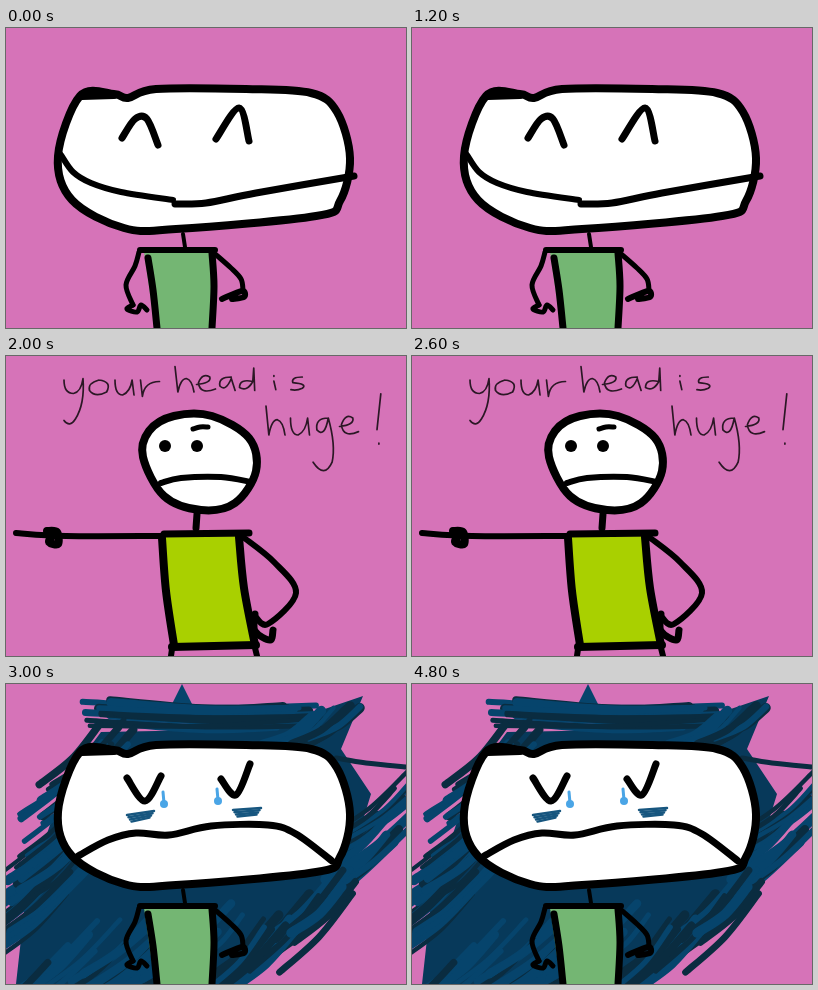
An HTML page with a canvas that plays this animation: 400x300 px, repeating every 6 s.

```html
<!DOCTYPE html>
<html>
<head>
<meta charset="utf-8">
<style>
html, body { margin: 0; width: 100%; height: 100%; overflow: hidden; background: #d673b8; }
canvas { display: block; }
</style>
</head>
<body>
<canvas id="stage" width="400" height="300"></canvas>
<script>
const ctx = document.getElementById('stage').getContext('2d');
ctx.lineCap = ctx.lineJoin = 'round';
const NAVY = '#0a2c40', BLUE = '#06446c', TEAR = '#4aa5e6';

// Smooth brush line through "x,y x,y ..." points; a fill closes the shape.
function brush(points, width, color = '#000', fill) {
  const p = points.split(' ').map(s => s.split(',').map(Number)), n = p.length;
  const at = i => fill ? p[(i + n) % n] : p[Math.max(0, Math.min(n - 1, i))];
  ctx.beginPath();
  ctx.moveTo(...p[0]);
  for (let i = 0; i < (fill ? n : n - 1); i++) {
    const [a, b, c, d] = [at(i - 1), at(i), at(i + 1), at(i + 2)];
    ctx.bezierCurveTo(b[0] + (c[0] - a[0]) / 6, b[1] + (c[1] - a[1]) / 6,
      c[0] - (d[0] - b[0]) / 6, c[1] - (d[1] - b[1]) / 6, ...c);
  }
  if (fill) { ctx.fillStyle = fill; ctx.fill(); }
  ctx.lineWidth = width;
  ctx.strokeStyle = color;
  ctx.stroke();
}

function polygon(points, color) {
  ctx.fillStyle = color;
  ctx.fill(new Path2D(`M${points}Z`));
}

function dot(x, y, r, color = '#000') {
  ctx.fillStyle = color;
  ctx.beginPath();
  ctx.arc(x, y, r, 0, 7);
  ctx.fill();
}

// Pen letters: lowercase bodies fill a unit square.
const letters = {
  y: 'M0 0Q0 .9.5 .9Q.9.8 1-.1Q1.1 1.6.6 2.6Q.3 3.2 0 2.7',
  o: 'M.5 0Q-.1.2 0 .7Q.3 1.2.9.8Q1.2.1.5 0',
  u: 'M0 0Q0 1 .4 1Q.8.8.9 0L1 1',
  r: 'M0 0L.1 1.1Q.2.1 1 .1',
  h: 'M0-.7L.15 1Q.3.1.6.1Q.9.2 1 1',
  e: 'M0 .5Q.8.4.7 0Q.3-.3.1.4Q.2 1.2 1 .8',
  a: 'M.7 0Q0 0 .1.6Q.4 1 .7.1L.9.9',
  d: 'M.7.3Q0 .1 0 .7Q.4 1 .7.3L.75-.6L.8.9',
  g: 'M.7 0Q0 0 .1.7Q.5 1.2.7 0Q1.1 1.6.9 2.6Q.5 3.6-.1 2.6',
  i: 'M.1.3L.2.9M.1-.1V-.05',
  s: 'M.7 0Q.1 0 .2.4Q1 .5.7.8Q.4 1 .1.9',
  '!': 'M.2-1.3L0 .8M.1 1.6V1.65'
};

function write(word, x, y, advance, height) {
  const path = new Path2D();
  [...word].forEach((c, i) => path.addPath(new Path2D(letters[c]),
    new DOMMatrix([19, 0, 0, height, x + i * advance, y])));
  ctx.lineWidth = 1.7;
  ctx.strokeStyle = 'rgba(0,0,0,.8)';
  ctx.stroke(path);
}

function bigHead() {
  brush('74,68 108,66 122,70 150,61 240,61 305,65 331,84 344,130 334,173 310,188 170,201 118,200 66,172 52,128', 8, '#000', '#fff');
  brush('76,68 108,67', 8);
}

function greenBody() {
  polygon('138,224 206,224 206,300 149,300', '#74b673');
  brush('177,206 179,219', 4);
  brush('134,222 209,222', 6);
  brush('142,230 147,262 151,300', 7);
  brush('206,225 208,258 206,300', 7);
  brush('133,224 129,238 120,257 127,277', 5);
  brush('127,277 121,281 131,284 135,277 141,282', 5);
  brush('208,225 225,240 235,251 237,262', 5);
  brush('216,271 236,263 238,269 226,271', 6);
}

function happy() {
  bigHead();
  brush('55,127 67,144 85,155 115,164 167,172', 6);
  brush('169,176 200,175 250,165 348,148', 7);
  brush('116,110 129,91 141,91 152,117', 7);
  brush('210,111 233,80 243,113', 7);
  greenBody();
}

function pointing() {
  polygon('156,181 234,180 248,288 168,290', '#a9d000');
  brush('168,60 206,60 243,82 250,115 229,147 195,154 158,140 137,101 143,75', 8, '#000', '#fff');
  dot(159, 90, 6);
  dot(191, 90, 6);
  brush('187,73 194,71 202,71', 5);
  brush('155,127 175,122 215,121 245,126', 6);
  brush('191,158 190,172', 7);
  brush('158,178 243,177', 7);
  brush('156,182 160,235 168,289', 8);
  brush('233,181 238,232 249,289', 8);
  brush('166,291 250,289', 8);
  brush('166,293 165,300', 6);
  brush('249,292 251,300', 6);
  brush('10,177 60,180 155,180', 6);
  brush('41,175 51,176 52,188 43,186 46,180', 8);
  brush('237,181 268,206 290,237 262,268 249,260', 6);
  brush('249,258 249,275 264,284 267,274', 7);
  write('your', 58, 24, 25.5, 15);
  write('head', 169, 21, 21.5, 15);
  write('is', 266, 21, 17, 14);
  write('huge', 260, 62, 24.5, 17);
  write('!', 371, 60, 0, 17);
}

// Slanted strokes of half-length (vx, vy), scattered along a line.
function scribble(rnd, count, [x0, y0], [x1, y1], [vx, vy], spread) {
  const jitter = size => (rnd() - 0.5) * size;
  for (let i = 0; i < count; i++) {
    const t = rnd(), k = 0.6 + rnd() * 0.5;
    const x = x0 + (x1 - x0) * t + jitter(spread);
    const y = y0 + (y1 - y0) * t + jitter(spread);
    const dx = vx * k, dy = vy * k + jitter(8);
    const tone = rnd() < 0.5 ? NAVY : BLUE;
    brush(`${x - dx},${y - dy} ${x + 3},${y + 4} ${x + dx},${y + dy}`, 4 + rnd() * 6, tone);
  }
}

function storm() {
  let seed = 7;
  const rnd = () => (seed = seed * 16807 % 2147483647) / 2147483647;
  polygon('95,48 260,45 357,12 335,65 365,110 345,175 290,245 215,300 10,300 20,210 60,95', '#07395a');
  polygon('166,20 176,0 186,20', BLUE);
  scribble(rnd, 16, [195, 22], [198, 42], [110, 0], 8);
  scribble(rnd, 9, [270, 52], [332, 40], [26, -18], 8);
  scribble(rnd, 42, [80, 78], [18, 235], [45, -40], 34);
  scribble(rnd, 26, [15, 285], [200, 275], [46, -36], 40);
  scribble(rnd, 24, [372, 115], [335, 195], [44, -32], 34);
  scribble(rnd, 22, [225, 275], [325, 225], [38, -38], 40);
  brush('330,74 360,79 400,83', 5, NAVY);
  bigHead();
  brush('72,172 102,156 130,149 163,151 205,142 262,141 290,150 326,177', 7);
  brush('121,94 139,117 155,92', 7);
  brush('215,95 230,111 244,80', 7);
  for (let i = 0; i < 4; i++) {
    const y = i * 2.2, inset = i * 1.5;
    brush(`${121 + inset},${131 + y} ${148 - inset},${127 + y}`, 2.5, '#17567f');
    brush(`${227 + inset},${126 + y} ${255 - inset},${124 + y}`, 2.5, '#17567f');
  }
  for (const [x, y] of [[157, 108], [211, 105]]) {
    brush(`${x},${y} ${x + 1},${y + 11}`, 3, TEAR);
    dot(x + 1, y + 12, 4, TEAR);
  }
  greenBody();
}

let shown;
function frame() {
  const t = performance.now() % 6000;
  const scene = t < 2000 ? happy : t < 3000 ? pointing : storm;
  if (scene !== shown) {
    ctx.fillStyle = '#d673b8';
    ctx.fillRect(0, 0, 400, 300);
    scene();
    shown = scene;
  }
  requestAnimationFrame(frame);
}
frame();
</script>
</body>
</html>
```
